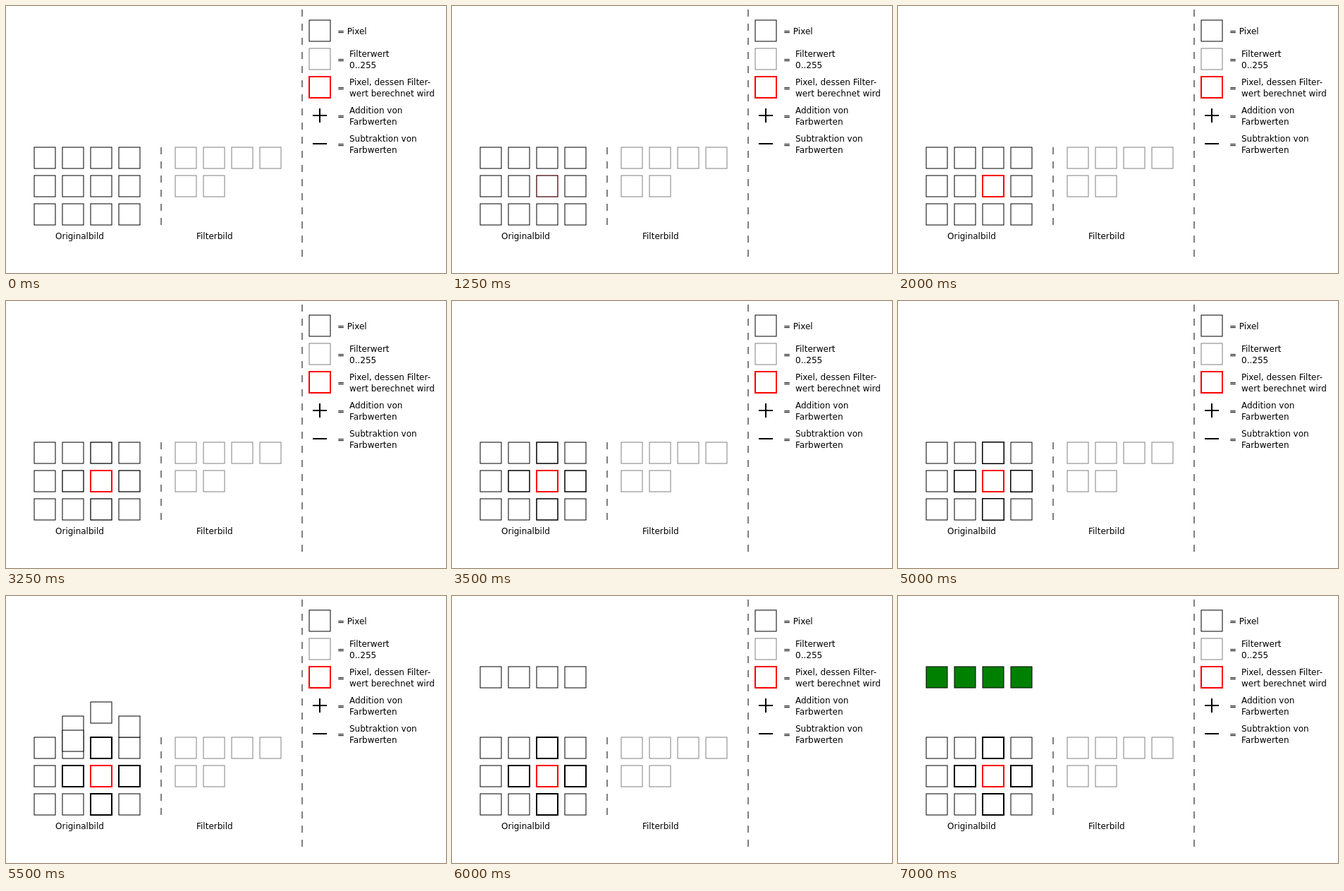
Animation, 624 px wide and 378 px high, one loop 8000 ms. Source, as an HTML page:

```html
<!DOCTYPE html>
<html lang="de">
<head>
<meta charset="utf-8">
<title>Filterbild</title>
<style>
  html, body { margin: 0; width: 100%; height: 100%; overflow: hidden; background: #fff; }
  svg { display: block; width: 624px; height: 378px; }
  text { font: 12px "DejaVu Sans", sans-serif; fill: #000; white-space: pre; }
</style>
</head>
<body>
<svg id="stage" viewBox="0 0 624 378"></svg>
<script>
const LOOP = 8000, STEP = 250, SIZE = 30, PITCH = 40;
const stage = document.getElementById('stage');

function add(tag, attrs, content) {
  const el = document.createElementNS('http://www.w3.org/2000/svg', tag);
  for (const key in attrs) el.setAttribute(key, attrs[key]);
  if (content) el.textContent = content;
  stage.append(el);
  return el;
}

const box = (x, y, stroke = '#000', width = 1, fill = '#fff') =>
  add('rect', { x, y, width: SIZE, height: SIZE, stroke, 'stroke-width': width, fill });
const line = (d, width, dash = 'none') =>
  add('path', { d, stroke: '#000', 'stroke-width': width, 'stroke-dasharray': dash, fill: 'none' });
const label = (x, y, content) => add('text', { x, y }, content);

// Left: pixel grid and filter values
const grid = [];
for (let row = 0; row < 3; row++) {
  grid.push([]);
  for (let col = 0; col < 4; col++) grid[row].push(box(40 + col * PITCH, 200 + row * PITCH));
}
for (let i = 0; i < 6; i++) box(240 + i % 4 * PITCH, 200 + Math.floor(i / 4) * PITCH, '#808080');
line('M220 200V310', 1, '10 10');
label(70, 330, 'Originalbild');
label(270, 330, 'Filterbild');

// Right: legend
line('M420 5V355', 1, '10 10');
box(430, 20);
box(430, 60, '#808080');
box(430, 100, '#f00', 2);
line('M435 155H455M445 145V165', 2);
line('M435 195H455', 2);
label(470, 40, '= Pixel');
[
  ['Filterwert', '0..255'],
  ['Pixel, dessen Filter-', 'wert berechnet wird'],
  ['Addition von', 'Farbwerten'],
  ['Subtraktion von', 'Farbwerten']
].forEach(([top, bottom], i) => {
  const y = 80 + i * PITCH;
  label(470, y, '=');
  label(487, y - 8, top);
  label(487, y + 8, bottom);
});

// Neighbours of the chosen pixel, each with a copy that moves up into a row
const chosen = grid[1][2];
const moves = [
  { row: 0, col: 2, to: 120 },
  { row: 1, col: 1, to: 80 },
  { row: 1, col: 3, to: 160 },
  { row: 2, col: 2, to: 40 }
].map(m => ({ ...m, x: 40 + m.col * PITCH, y: 200 + m.row * PITCH, copy: box(0, 0) }));

const mix = (a, b, p) => a + (b - a) * p;

function draw(time) {
  const t = Math.floor(time % LOOP / STEP) * STEP;
  const since = start => Math.min(1, Math.max(0, (t - start) / 1000));
  const mark = since(1000), bold = since(3000), move = since(5000);

  chosen.setAttribute('stroke', `rgb(${Math.round(255 * mark)},0,0)`);
  chosen.setAttribute('stroke-width', 1 + mark);
  for (const m of moves) {
    grid[m.row][m.col].setAttribute('stroke-width', 1 + bold);
    m.copy.setAttribute('x', mix(m.x, m.to, move));
    m.copy.setAttribute('y', mix(m.y, 100, move));
    m.copy.setAttribute('fill', t >= 7000 ? '#008000' : '#fff');
    m.copy.setAttribute('visibility', t >= 5000 ? 'visible' : 'hidden');
  }
}

const start = performance.now();
function tick() {
  draw(performance.now() - start);
  requestAnimationFrame(tick);
}
tick();
</script>
</body>
</html>
```
